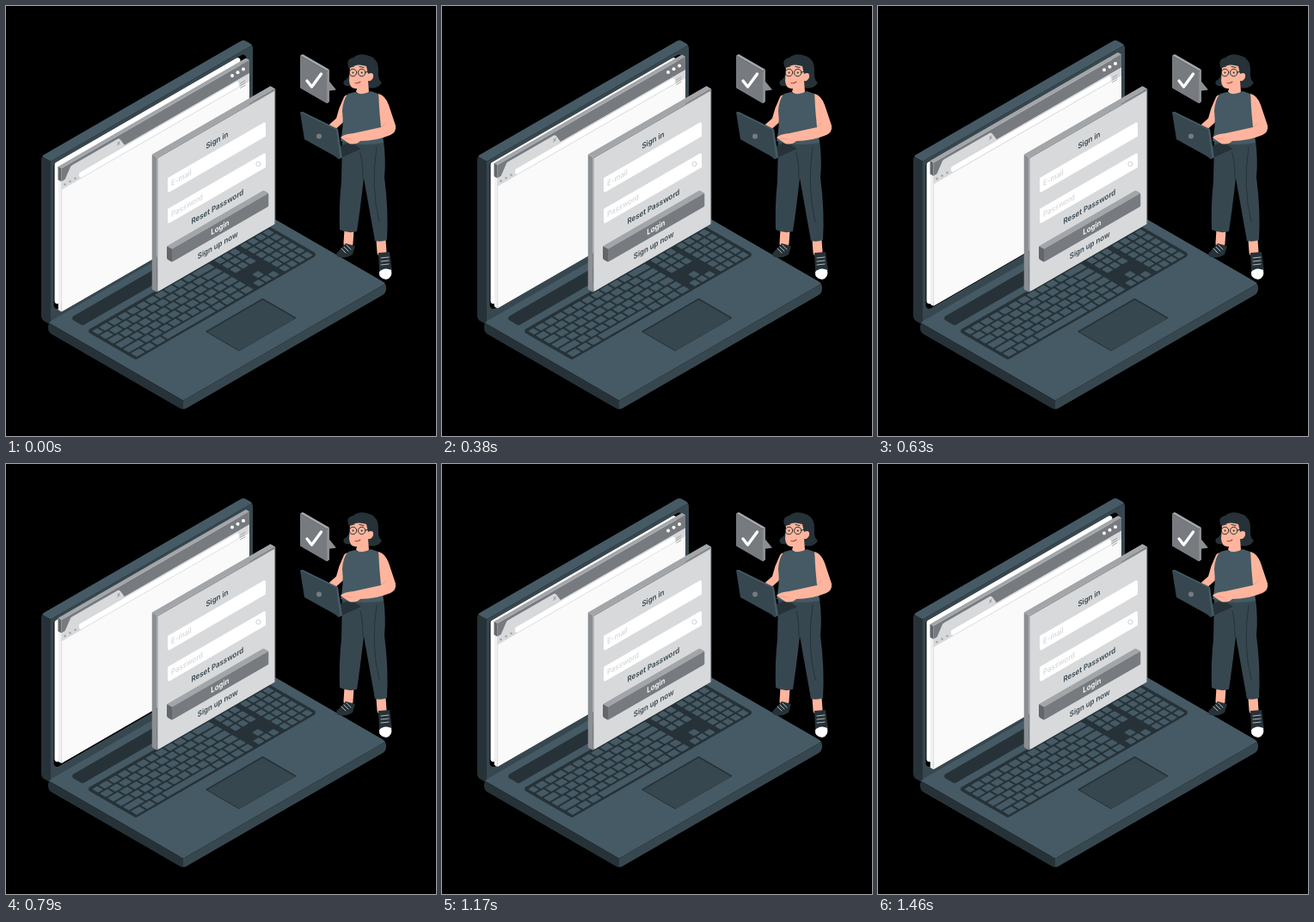
Animation, 500 px wide and 500 px high, one loop 1.5 s. Source, as an HTML page with a canvas:

```html
<!DOCTYPE html>
<html lang="en">
<head>
<meta charset="utf-8">
<title>Sign in</title>
<style>
html, body { margin: 0; width: 100%; height: 100%; overflow: hidden; background: #000; }
canvas { display: block; width: 500px; height: 500px; }
</style>
</head>
<body>
<canvas id="stage" width="500" height="500"></canvas>
<script>
const ctx = document.getElementById('stage').getContext('2d');
const LOOP = 1500, FPS = 24, LIFT = 8;
const INK = '#263238', DARK = '#37474f', SLATE = '#455a64', SKIN = '#ffb59d';
const GREY = '#777b80', PALE = '#d7d9db', RIM = '#a3a6a9', SHADE = '#62666a';

// Isometric directions: U up-right, V down-right, H straight down
const SLOPE = Math.tan(Math.PI / 6);
const U = n => [n, -n * SLOPE];
const V = n => [n, n * SLOPE];
const H = n => [0, n];
const add = (a, b) => [a[0] + b[0], a[1] + b[1]];

function trace(pts, r) {
  ctx.beginPath();
  ctx.moveTo(...add(pts[0], pts.at(-1)).map(n => n / 2));
  pts.forEach((p, i) => ctx.arcTo(...p, ...pts[(i + 1) % pts.length], r));
  ctx.closePath();
}

// Parallelogram spanned by directions a and b
function face(color, x, y, a, b, r = 0) {
  const o = [x, y];
  trace([o, add(o, a), add(add(o, a), b), add(o, b)], r);
  ctx.fillStyle = color;
  ctx.fill();
}

// Box whose top face has its left corner at x, y
function block(x, y, u, v, h, top, left, front, r) {
  const o = [x, y], right = add(o, U(u)), near = add(o, V(v)), far = add(right, V(v));
  ctx.save();
  trace([o, right, far, add(far, H(h)), add(near, H(h)), add(o, H(h))], r);
  ctx.clip();
  face(top, x, y, U(u), V(v));
  face(left, x, y, V(v), H(h));
  face(front, ...near, U(u), H(h));
  ctx.restore();
}

function curve(color, width, path) {
  ctx.strokeStyle = color;
  ctx.lineWidth = width;
  ctx.lineCap = ctx.lineJoin = 'round';
  ctx.stroke(new Path2D(path));
}

function shape(color, path) {
  ctx.fillStyle = color;
  ctx.fill(new Path2D(path));
}

function dot(color, x, y, r) {
  ctx.beginPath();
  ctx.arc(x, y, r, 0, 7);
  ctx.fillStyle = color;
  ctx.fill();
}

function ring(color, width, x, y, r) {
  ctx.beginPath();
  ctx.arc(x, y, r, 0, 7);
  ctx.strokeStyle = color;
  ctx.lineWidth = width;
  ctx.stroke();
}

function label(text, x, y, color, weight = 600) {
  ctx.save();
  ctx.transform(0.866, -0.5, 0, 1, x, y);
  ctx.font = `${weight} 9.1px Inter, sans-serif`;
  ctx.fillStyle = color;
  ctx.fillText(text, 0, 0);
  ctx.restore();
}

function drawLid() {
  block(41, 174.5, 235, 11, 190, SLATE, INK, DARK, 8);
  face('#000', 55.5, 183, U(224), H(172), 4);
  face('#fff', 56.5, 182.5, U(216), H(166), 3);
}

function drawBrowser(lift) {
  ctx.save();
  ctx.translate(0, -lift);
  block(60.5, 186.5, 218.5, 4, 167, RIM, '#f0f0f0', '#fafafa', 2);
  curve('#dedede', 1, 'M64.7 205 V354');
  face(SHADE, 60.5, 186.5, V(4), H(15.5));
  face(GREY, 64.5, 188.8, U(218.5), H(15.5));
  face(PALE, 64.5, 204.3, U(218.5), H(9.5));
  shape(PALE, 'M68 203 L74.5 188 Q75 186 77 185 L130 154.5 Q132 153.5 133.5 156 L138 162Z');
  face('#fff', 85, 194, U(186), H(7), 2);
  curve(GREY, .7, 'M129.7 158.5 l2.5 2.5 m0 -3.5 l-2.5 4.5');
  for (let i = 0; i < 3; i++) {
    dot('#fff', 263 + i * 6.5, 81 - i * 3.7, 2);
    dot(RIM, 68.5 + i * 6, 207.5 - i * 3.5, 1.3);
    curve(RIM, 1, `M272.5 ${90 + i * 2.7} l5.5 -3.2`);
  }
  ctx.restore();
}

// Evenly spaced keys; u along the row, v towards the user
function keyRun(u, width, count, v) {
  const step = width / count;
  for (let i = 0; i < count; i++) {
    const [x, y] = add(add([96, 378], U(u + i * step)), V(v));
    face(SLATE, x, y, U(step - 2), V(7), .7);
  }
}

function drawDeck() {
  block(49, 368, 236, 157, 11.5, SLATE, INK, DARK, 9);
  face(INK, 74, 363, U(146), V(15), 3);
  face(INK, 93, 378, U(212), V(58), 3);
  face(INK, 231.5, 378.5, U(67), V(39.5), 1);
  face(DARK, 234, 379, U(64.5), V(37.5), 1);
  for (let row = 0; row < 6; row++) {
    const v = 2 + row * 9, lead = 8 + row * 3;
    if (row < 5) {
      keyRun(2, lead, 1, v);
      keyRun(2 + lead, 108, 10, v);
      keyRun(110 + lead, 30 - lead, 1, v);
    } else {
      keyRun(2, 36, 3, v);
      keyRun(38, 58, 1, v);
      keyRun(96, 44, 4, v);
    }
    if (row < 3 || row > 4) keyRun(144, 26, 3, v);
    if (row === 4) keyRun(152, 9, 1, v);
    keyRun(174, 35, 4, v);
  }
}

function drawPanel() {
  block(169.5, 172.5, 138, 6, 157, RIM, '#8b8e92', '#909397', 2);
  face(PALE, 176.5, 177, U(135.5), H(155), 1);
  label('Sign in', 232.5, 166.5, DARK);
  for (const [text, y] of [['E-mail', 200], ['Password', 236]]) {
    face('#fff', 188, y, U(114), H(17.5), 1.5);
    label(text, 192, y + 9.7, '#d3d5d7', 500);
  }
  ring('#cfd1d3', 1, 293.4, 183.7, 2.6);
  label('Reset Password', 215.5, 254, DARK);
  block(187, 279, 112.5, 6, 15.5, RIM, SHADE, GREY, 3);
  label('Login', 238.3, 266.5, '#fff');
  label('Sign up now', 222.8, 294.7, DARK);
}

function drawBubble() {
  shape('#8c8f92', 'M373 84 L384 97.5 L373 99Z');
  block(342, 57.5, 3, 31, 38, RIM, GREY, '#8c8f92', 1.5);
  curve('#fff', 3.4, 'M350 87 L355.5 94 L366.5 79');
}

function drawLegs() {
  curve(SKIN, 11, 'M399 260 L398 276 M436 272 L437 286');
  shape(INK, 'M384 288 L395 276 L406 279 L403 289 Q393 295 385 291Z M433 287 L446 286 L449 308 H434Z');
  for (let i = 0; i < 3; i++) {
    curve(PALE, .8, `M${390 + i * 3} ${282 - i * 2} l5 5 M436 ${293 + i * 4} l9 -1`);
  }
  shape('#fff', 'M434 309 Q440 303 448 307 Q450 316 442 318 Q433 317 434 309Z');
  shape(DARK, 'M391 154 L439 156 Q442 180 440 199 Q445 238 443 272 Q436 275 429 273 L416 200 Q412 236 408 262 Q398 265 388 260 Q387 230 390 204Z');
  curve(INK, 1, 'M415 200 Q415 180 412 171 M431 164 Q424 210 434 251');
}

function drawHead() {
  shape(INK, 'M400 74 Q393 62 404 60 Q412 53 425 59 Q433 63 433 74 Q432 86 437 89 Q433 97 422 95 L396 93 Q391 92 393 87 Q400 84 400 74Z');
  shape(SKIN, 'M400 72 Q408 66 419 70 L421 79 Q428 76 427 83 Q425 88 421 87 L422 100 Q415 107 407 100 L408 96 Q400 97 399 87Z');
  for (const x of [403.5, 413.7]) {
    ring(INK, 1, x, 77.5, 4.2);
    dot(INK, x, 77.5, 1);
  }
  curve(INK, 1, 'M418 77 L423 76 M401 71 l4 -1 M411 70.5 l5 1');
  curve('#a6483f', 1.1, 'M406 89.5 Q409 90.5 412 88');
}

function drawWoman() {
  drawLegs();
  curve(SKIN, 9, 'M397 108 Q391 120 388 133 L379 141');
  drawHead();
  shape(SLATE, 'M398 102 L406 100 Q414 105 424 99 L433 102 Q435 130 439 159 Q414 164 389 157 Q393 140 391 122 Q392 108 398 102Z');
  shape(INK, 'M386 178 L413 166 L401 158 L376 168Z');
  shape(SLATE, 'M342 123.5 L345 123 L386 143 L391 176 L387 178Z');
  shape(DARK, 'M342 123.5 L384 144 L388.5 178 L347 155Z');
  dot(GREY, 364, 151.5, 3);
  shape(SKIN, 'M433 102 Q441 104 445 115 L453 139 Q454 147 447 150 Q430 157 412 157 Q407 162 399 160 L389 153 Q392 149 404 148 L436 141Q434 122 433 102Z');
  curve('#e9967f', .8, 'M394 154 L402 155 M436 141 Q439 139 441 136');
}

function render(now) {
  const step = Math.floor((now % LOOP) * FPS / 1000 + .1);
  const phase = (step * 1000 / FPS / LOOP) % 1;
  ctx.clearRect(0, 0, 500, 500);
  drawLid();
  drawBrowser(LIFT * (1 - Math.abs(1 - 2 * phase)));
  drawDeck();
  drawPanel();
  drawBubble();
  drawWoman();
}

const start = performance.now();
function tick() {
  render(performance.now() - start);
  requestAnimationFrame(tick);
}
tick();
</script>
</body>
</html>
```
